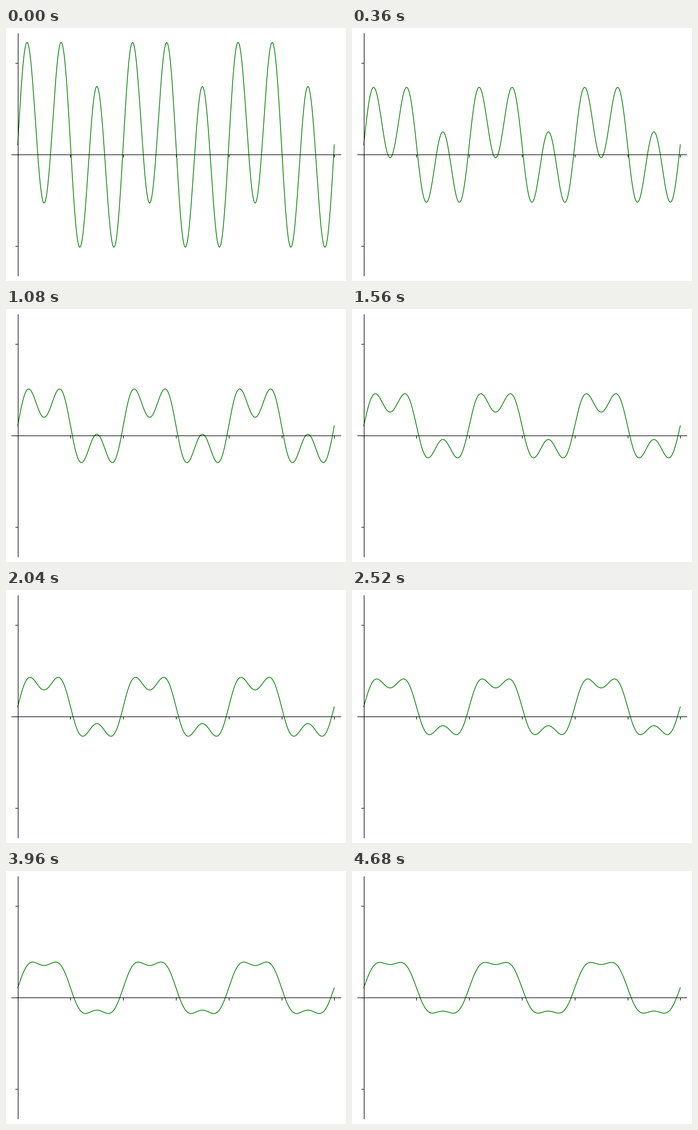
Recreate the animation shown at these times as a matplotlib script. Size 630 by 470 pixels, loop 4.8 s.

```python
import numpy as np
import matplotlib.pyplot as plt
from matplotlib.animation import FuncAnimation

W, H, DPI = 630, 470, 100
FRAMES, INTERVAL = 40, 120
PAD = 10            # pixels around the axes
UNIT = 170          # pixels per unit of y

span = 6 * np.pi
x = np.linspace(0, span, 1000)
divisors = np.linspace(1 / 3, 5, FRAMES)


def wave(k):
    """Offset sine plus a third harmonic that fades as k grows."""
    return (1 / 3 + np.sin(x) + np.sin(3 * x) / k) / np.pi


fig = plt.figure(figsize=(W / DPI, H / DPI), dpi=DPI, facecolor="white")
ax = fig.add_axes([PAD / W, PAD / H, 1 - 2 * PAD / W, 1 - 2 * PAD / H])
y_max = (H / 2 - PAD) / UNIT
ax.set_xlim(-0.02 * span, 1.02 * span)
ax.set_ylim(-y_max, y_max)

for side in ("left", "bottom"):
    ax.spines[side].set_position("zero")
for side in ("right", "top"):
    ax.spines[side].set_visible(False)
ax.set_xticks(np.arange(7) * np.pi)
ax.set_yticks([-1, 0, 1])
ax.tick_params(labelbottom=False, labelleft=False)

line, = ax.plot(x, wave(divisors[0]), color="green", lw=1)


def update(i):
    line.set_ydata(wave(divisors[i]))
    return line,


anim = FuncAnimation(fig, update, frames=FRAMES, interval=INTERVAL,
                     repeat=True, repeat_delay=0, blit=False)
plt.show()
```
